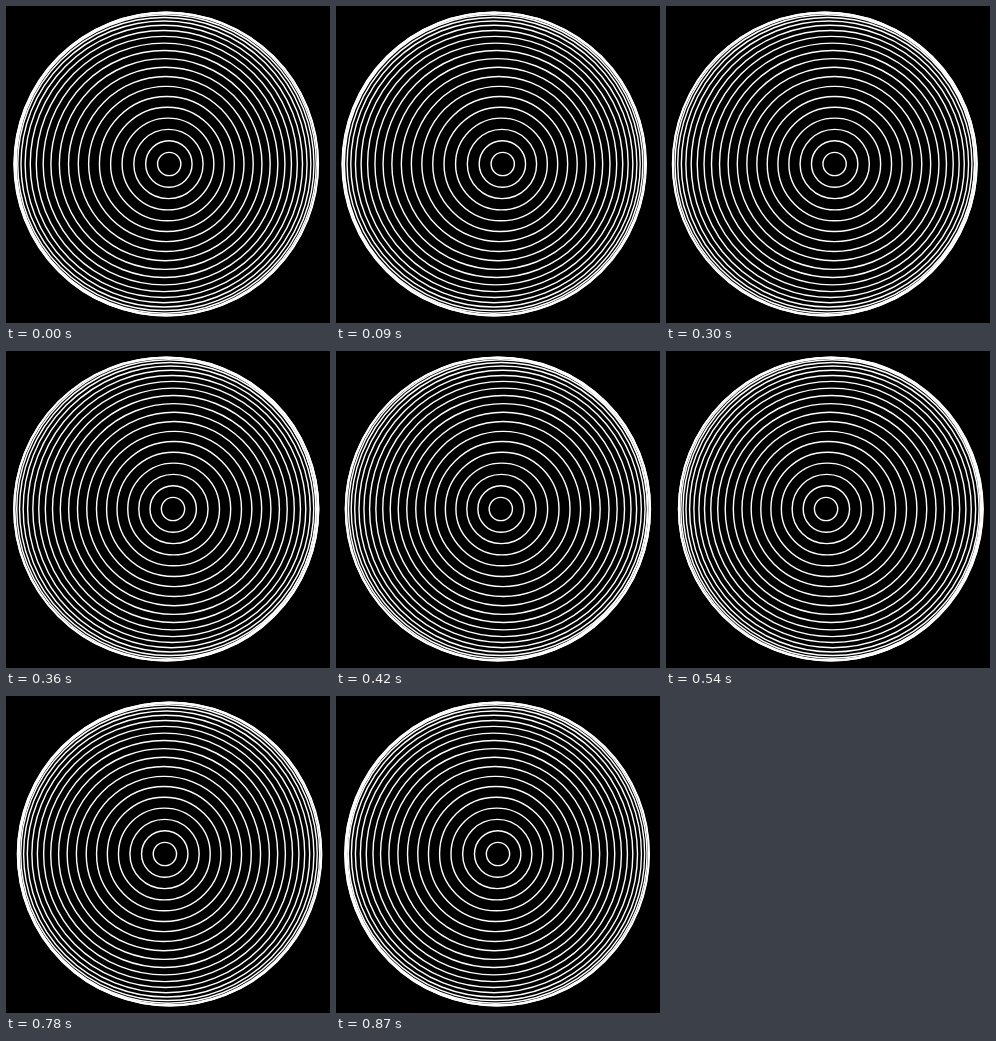
Recreate the animation shown at these times as an HTML page with a canvas. Size 324 by 317 pixels, loop 900 ms.

```html
<!DOCTYPE html>
<html lang="en">
<head>
<meta charset="utf-8">
<title>Swaying rings</title>
<style>
html, body { margin: 0; overflow: hidden; background: #000; }
canvas { display: block; }
</style>
</head>
<body>
<canvas width="324" height="317"></canvas>
<script>
const ctx = document.querySelector('canvas').getContext('2d');
const LOOP = 900, STEP = 30, RINGS = 22, RADIUS = 152;

function draw(now) {
  const time = Math.floor(now % LOOP / STEP) * STEP;
  const angle = time / LOOP * 2 * Math.PI;
  ctx.fillStyle = '#000';
  ctx.fillRect(0, 0, 324, 317);
  ctx.strokeStyle = '#fff';
  ctx.lineWidth = 1.4;
  for (let i = 1; i <= RINGS; i++) {
    const k = i / RINGS;
    // The sway travels outwards and weakens towards the rim.
    const sway = (6 - 2 * k) * Math.sin(angle - Math.PI * k ** 1.5);
    const x = 163.4 - 2.2 * k * k + sway;
    ctx.beginPath();
    ctx.arc(x, 158, RADIUS * Math.sin(i * Math.PI / 41), 0, 2 * Math.PI);
    ctx.stroke();
  }
  requestAnimationFrame(draw);
}
requestAnimationFrame(draw);
</script>
</body>
</html>
```
